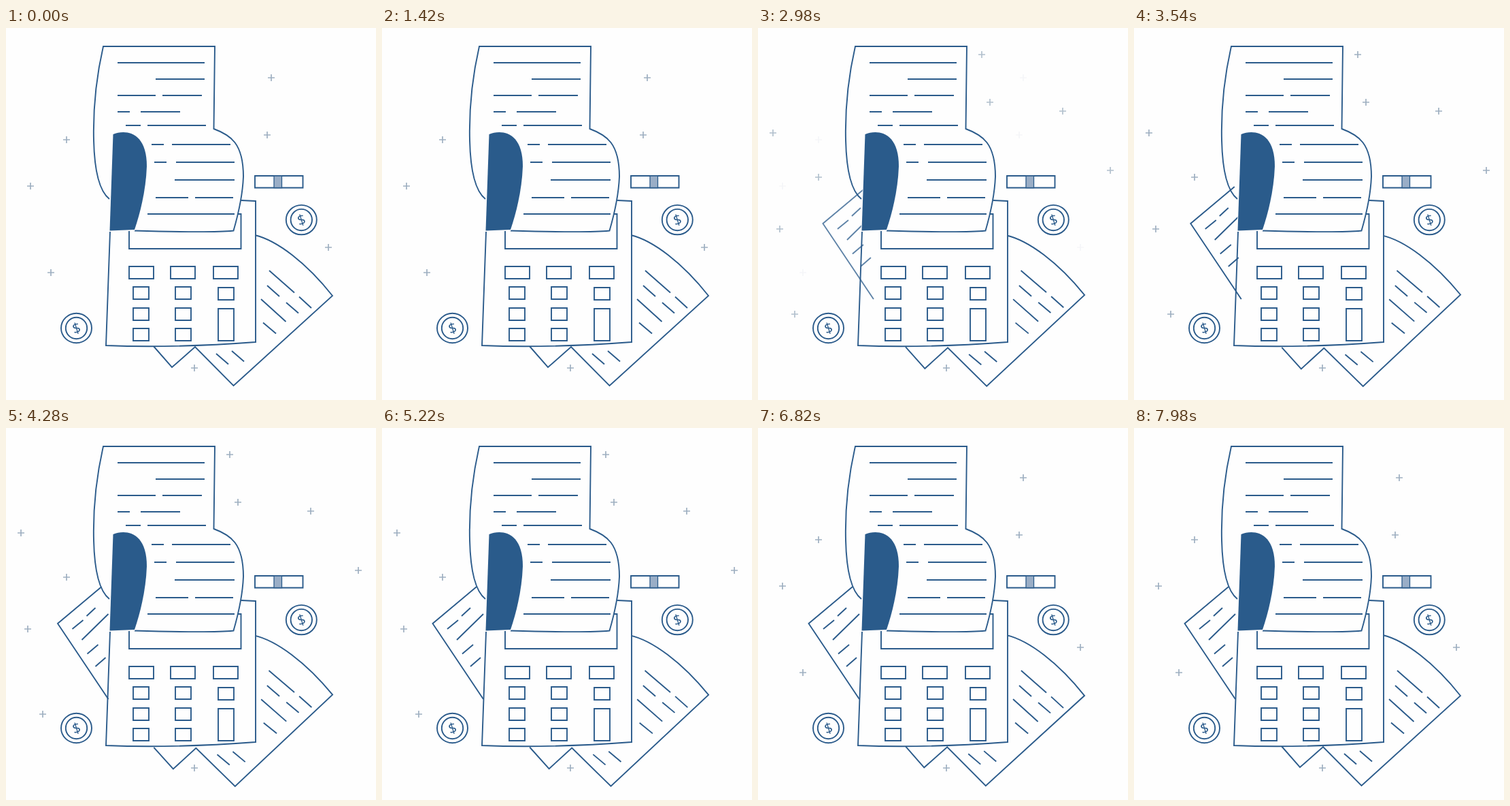
These frames come from a looping animation (544 px wide and 546 px high, 8000 ms). An HTML page:

```html
<!DOCTYPE html>
<html lang="en">
<head>
<meta charset="utf-8">
<title>Calculator and receipts</title>
<style>
  html, body { margin: 0; width: 100%; height: 100%; overflow: hidden; background: #fefefe; }
  svg { display: block; width: 100%; height: 100%; }
  .line { fill: none; stroke: #2b5b8b; stroke-width: 1.9; }
  .solid { fill: #fefefe; }
  .plus { fill: none; stroke: #9fb0c1; stroke-width: 1.7; }
  text { font: 21px "Open Sans", sans-serif; fill: #2b5b8b; text-anchor: middle; }
</style>
</head>
<body>
<svg viewBox="0 0 544 546">
  <defs>
    <g id="coin">
      <ellipse class="line" rx="22.5" ry="21.7"/>
      <circle class="line" r="15.7"/>
      <text y="7.5" transform="rotate(-17)">$</text>
    </g>
  </defs>

  <path id="plusFirst" class="plus"/>
  <path id="plusSecond" class="plus"/>
  <path id="plusFixed" class="plus"/>

  <g id="rightPaper" class="line">
    <path d="M366 304C399 312 442 345 480 393L334.500 525L278 468L244 498L216 466"/>
    <path d="M387 356L424 388.500M384 378L402 394M431 394.500L449 411M375 398L411.500 431
             M412 403L430 418.500M378 432.500L397 448.500M309 478L327 493.500M332 474L350 489.500"/>
  </g>

  <path class="line solid" d="M153 299L147 466C220 469 300 466 367 461V254L346 253"/>
  <path class="line" d="M181 298V324H345.500V273H341"/>
  <path id="keys" class="line"/>

  <path class="line solid" d="M152 251C138 240 130 210 129 165C128 125 132 75 143 27H307L305.500 148
    C330 157 349 169 349 218C348 245 341 275 334.500 297.500C310 300 240 299 189 297.500"/>
  <path class="line" d="M164 51H292M220 75H292M164 99H220M230 99H288M164 123H182M198 123H256
    M176 143H198M208 143H294M214 171H232M244 171H330M218 197H236M250 197H336M248 223H336
    M220 249H268M278 249H334M208 273H336"/>

  <g id="leftPaper" class="line">
    <path d="M139 233L74.500 287L149 398"/>
    <path d="M130 264L117 276M112 282L96 295M149 273L110 311M134 318L118 331.500M145 337L130 350"/>
  </g>

  <path d="M157.500 156C175 149 207 151 207 203C206 235 198 270 189 296L152.500 297.500Z"
        fill="#2a5b8b" stroke="#fefefe" stroke-width="2" paint-order="stroke"/>

  <path class="line" d="M366 217H436.500V234.500H366Z"/>
  <path class="line" d="M394 217H405.500V234.500H394Z" style="fill:#9aaec7;stroke-width:1.300"/>
  <use href="#coin" x="103.500" y="440.500"/>
  <use href="#coin" x="434.300" y="281.600"/>
</svg>
<script>
  const LOOP = 8000;
  const el = id => document.getElementById(id);
  const clamp = v => Math.min(1, Math.max(0, v));
  const ramp = (t, from, to) => clamp((t - from) / (to - from));
  const smooth = u => u * u * (3 - 2 * u);

  const pluses = points => points.map(([x, y]) => `M${x - 5} ${y}h10M${x} ${y - 5}v10`).join('');
  const box = (x, y, w, h) => `M${x} ${y}h${w}v${h}h${-w}z`;

  el('plusFirst').setAttribute('d', pluses([[390, 73], [384, 157], [89, 164], [36, 232], [66, 359], [474, 322]]));
  el('plusSecond').setAttribute('d', pluses([[329, 39], [341, 109], [448, 122], [22, 154],
    [89, 219], [518, 209], [32, 295], [54, 420]]));
  el('plusFixed').setAttribute('d', pluses([[277, 499]]));

  el('keys').setAttribute('d',
    [181, 242, 305].map(x => box(x, 350, 36, 18)).join('') +
    [380, 411, 441].map(y => box(187, y, 23, 18) + box(249, y, 23, 18)).join('') +
    box(312, 381, 23, 18) + box(312, 412, 23, 47));

  function draw(t) {
    el('plusFirst').style.opacity = 1 - ramp(t, 1790, 3110) + ramp(t, 5550, 6600);
    el('plusSecond').style.opacity = ramp(t, 1740, 3300) - ramp(t, 5500, 6600);

    const slide = 92 * (1 - ramp(t, 1565, 5200)) ** 3;
    el('leftPaper').setAttribute('transform', `translate(${slide} 0)`);
    el('leftPaper').style.opacity = ramp(t, 1565, 3450);

    const tilt = smooth(ramp(t, 1500, 3700)) - smooth(ramp(t, 4600, 7500));
    el('rightPaper').setAttribute('transform', `rotate(${-0.95 * tilt} 388 388)`);
  }

  function tick() {
    draw(performance.now() % LOOP);
    requestAnimationFrame(tick);
  }
  tick();
</script>
</body>
</html>
```
